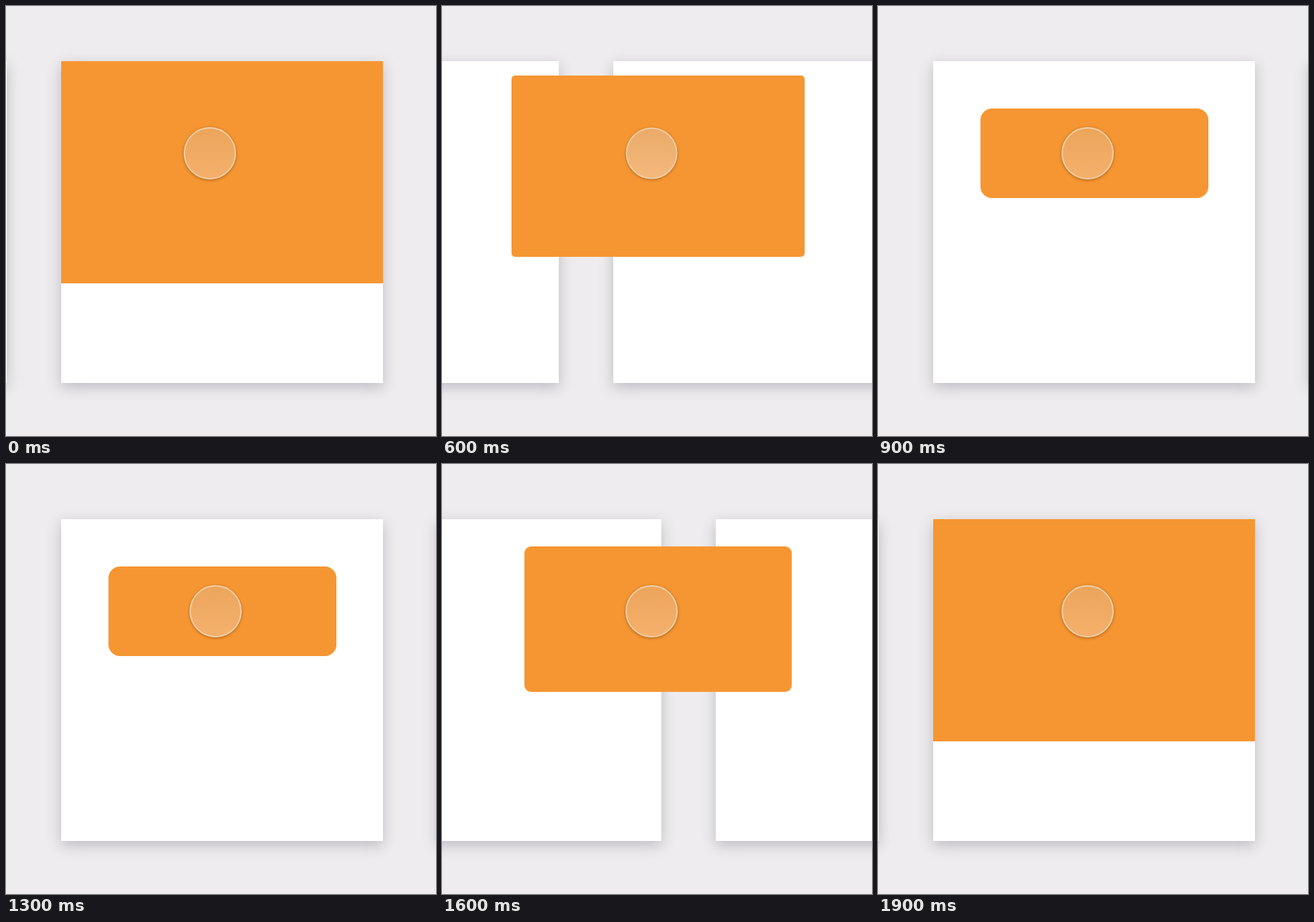
An HTML page that plays this animation: 600x600 px, repeating every 2500 ms.

```html
<!DOCTYPE html>
<html lang="en">
<head>
<meta charset="utf-8">
<title>Card transition</title>
<style>
  html, body { margin: 0; width: 100%; height: 100%; overflow: hidden; background: #eeecef; }
  #stage { position: relative; width: 600px; height: 600px; overflow: hidden; }
  #stage div { position: absolute; box-sizing: border-box; }
  .card {
    top: 77px; width: 449px; height: 449px; background: #fff;
    box-shadow: 0 6px 18px rgba(50, 45, 60, .25);
  }
  #hero { background: #f69632; }
  #touch {
    left: -36.5px; top: 169px; width: 73px; height: 73px; border-radius: 50%;
    border: 2px solid #f0cda6; overflow: hidden;
    background: linear-gradient(#eca55b, #f4b06c);
    box-shadow: 0 1px 4px rgba(70, 35, 0, .45);
  }
  #glow { inset: -1px; border-radius: 50%; background: linear-gradient(#e7b98a, #f4cba0); }
</style>
</head>
<body>
<div id="stage">
  <div class="card" id="first"></div>
  <div class="card" id="second"></div>
  <div id="hero"></div>
  <div id="touch"><div id="glow"></div></div>
</div>
<script>
const LOOP = 2500, STEP = 100, SLIDE = 320, PITCH = 525;
const OUT = 511, BACK = 1498;
const BIG = [77, 77, 449, 309.5, 0];
const SMALL = [143, 143, 317.5, 125, 16];
const el = id => document.getElementById(id);
const [first, second, hero, touch, glow] =
  ['first', 'second', 'hero', 'touch', 'glow'].map(el);

const mix = (a, b, k) => a + (b - a) * k;
const clamp = v => Math.min(1, Math.max(0, v));

// cubic-bezier(.4, 0, .2, 1), solved by bisection
function ease(x) {
  if (x <= 0 || x >= 1) return clamp(x);
  let lo = 0, hi = 1;
  for (let i = 0; i < 24; i++) {
    const u = (lo + hi) / 2, v = 1 - u;
    if (1.2 * v * v * u + 0.6 * v * u * u + u * u * u < x) lo = u; else hi = u;
  }
  return lo * lo * (3 - 2 * lo);
}

// linear interpolation through [time, value] pairs
function track(keys, t) {
  const i = keys.findIndex(key => key[0] > t);
  if (i === 0) return keys[0][1];
  if (i < 0) return keys[keys.length - 1][1];
  const [a, b] = [keys[i - 1], keys[i]];
  return mix(a[1], b[1], (t - a[0]) / (b[0] - a[0]));
}

const centre = [[0, 284], [100, 288], [200, 291], [300, 292]];
const press = [
  [300, 0], [400, .8], [500, 1], [600, .3], [700, 0],
  [1300, .02], [1400, .8], [1500, 1], [1600, 0]
];

function draw(t) {
  const k = ease((t - OUT) / SLIDE) - ease((t - BACK) / SLIDE);
  const x = mix(77, 77 + PITCH, k);
  first.style.left = x - PITCH + 'px';
  second.style.left = x + 'px';

  const [left, top, width, height, borderRadius] =
    BIG.map((v, i) => mix(v, SMALL[i], k) + 'px');
  Object.assign(hero.style, { left, top, width, height, borderRadius });

  // the press is over once the pages have settled
  const down = t >= 700 && t < 1300 ? 0 : track(press, t);
  touch.style.transform =
    `translateX(${track(centre, t)}px) scale(${1 - 0.05 * down})`;
  glow.style.opacity = down;
}

function tick() {
  const t = performance.now() % LOOP;
  draw(Math.floor(t / STEP) * STEP);
  requestAnimationFrame(tick);
}
draw(0);
tick();
</script>
</body>
</html>
```
